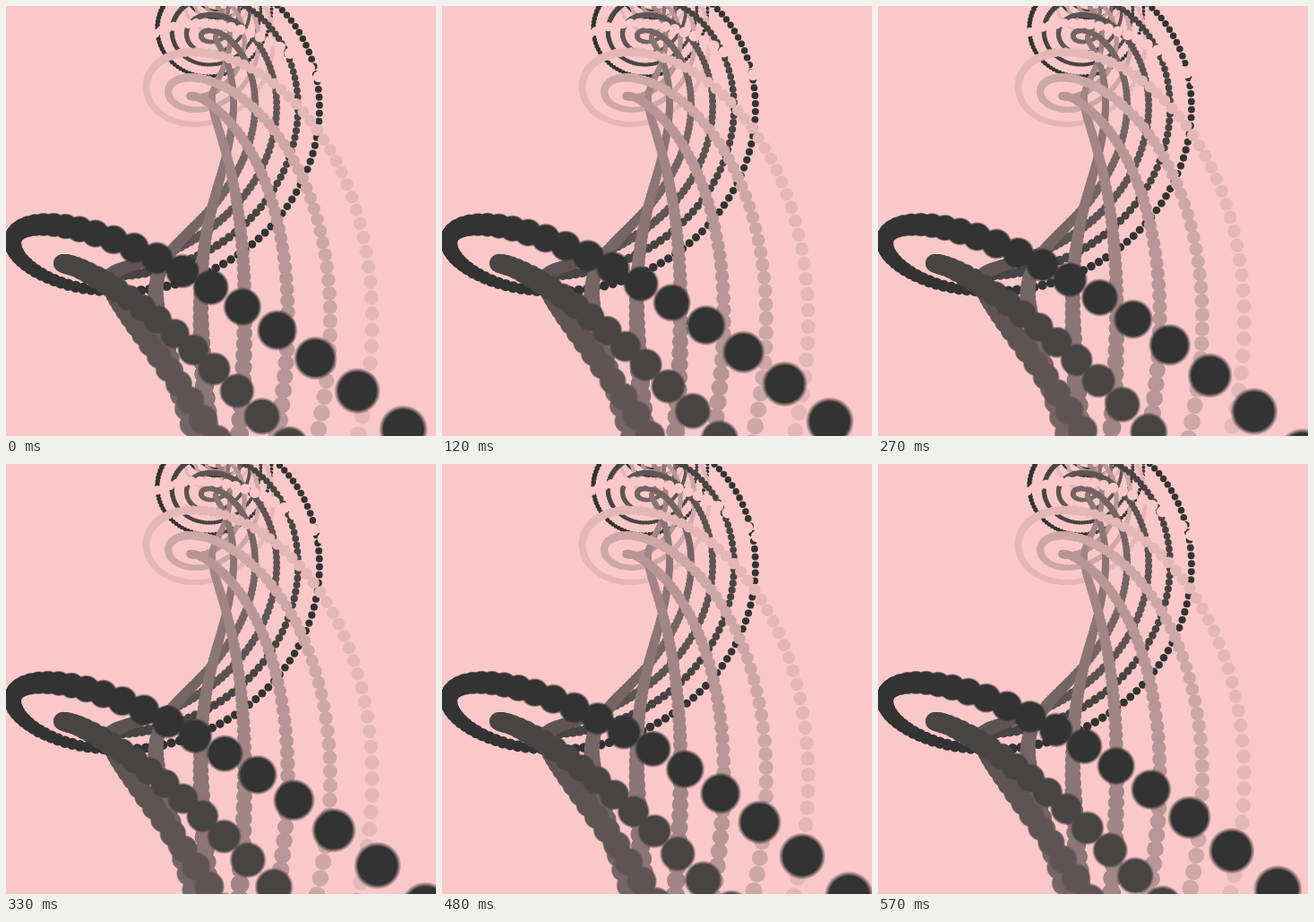
Recreate the animation shown at these times as an HTML page with a canvas. Size 480 by 480 pixels, loop 0.6 s.

```html
<!DOCTYPE html>
<html lang="en">
<head>
<meta charset="utf-8">
<title>Beaded helix</title>
<style>
  html, body { margin: 0; width: 100%; height: 100%; overflow: hidden; background: #fac8c8; }
  canvas { display: block; width: 100vmin; height: 100vmin; }
</style>
</head>
<body>
<canvas id="stage" width="480" height="480"></canvas>
<script>
const ctx = document.getElementById("stage").getContext("2d");
const SIZE = 480, LOOP = 600, TICK = 30;
const STRANDS = 10;
const STEP = 0.0207;       // half turns between neighbouring beads
const PHASE = 0.61;
const FIRST = -12, LAST = 272;
const INK = [51, 51, 51], PAPER = [250, 200, 200];

const mix = k => INK.map((c, i) => Math.round(c + (PAPER[i] - c) * k / (STRANDS - 1)));
const colors = Array.from({ length: STRANDS }, (_, k) => mix(k).join(","));

// A flat ribbon twisting around an axis that recedes upwards.
// turn: position in half turns; side: 1 .. -1 across the ribbon.
function project(turn, side) {
  const across = side * Math.sin(Math.PI * turn);
  const lift = side * Math.cos(Math.PI * turn);
  const z = 1 + 1.82 * turn - 0.25 * lift;
  return {
    x: 242 - 401 * across / z,
    y: 240 + (416.5 - 623 * turn - 355 * lift) / z,
    r: 14.6 / z,
    z
  };
}

function visible({ x, y, r, z }) {
  return z > 0.2 && x > -r - 4 && x < SIZE + r + 4 && y > -r - 4 && y < SIZE + r + 4;
}

function drawBead({ x, y, r, rgb }) {
  const soft = Math.max(0, (r - 8) * 0.16);   // near beads are out of focus
  if (soft > 0.3) {
    const fill = ctx.createRadialGradient(x, y, r - soft, x, y, r + soft);
    fill.addColorStop(0, `rgb(${rgb})`);
    fill.addColorStop(1, `rgba(${rgb},0)`);
    ctx.fillStyle = fill;
  } else {
    ctx.fillStyle = `rgb(${rgb})`;
  }
  ctx.beginPath();
  ctx.arc(x, y, r + soft, 0, 2 * Math.PI);
  ctx.fill();
}

function render(progress) {
  const beads = [];
  for (let k = 0; k < STRANDS; k++) {
    const side = 1 - 2 * k / (STRANDS - 1);
    for (let m = FIRST; m <= LAST; m++) {
      const bead = project((m - PHASE + progress) * STEP, side);
      if (visible(bead)) beads.push({ ...bead, rgb: colors[k] });
    }
  }
  beads.sort((a, b) => b.z - a.z);
  ctx.fillStyle = `rgb(${PAPER})`;
  ctx.fillRect(0, 0, SIZE, SIZE);
  beads.forEach(drawBead);
}

const start = performance.now();
let shown = -1;
function frame() {
  const elapsed = (performance.now() - start) % LOOP;
  const tick = Math.floor(elapsed / TICK);
  if (tick !== shown) {
    shown = tick;
    render(tick * TICK / LOOP);
  }
  requestAnimationFrame(frame);
}
frame();
</script>
</body>
</html>
```
